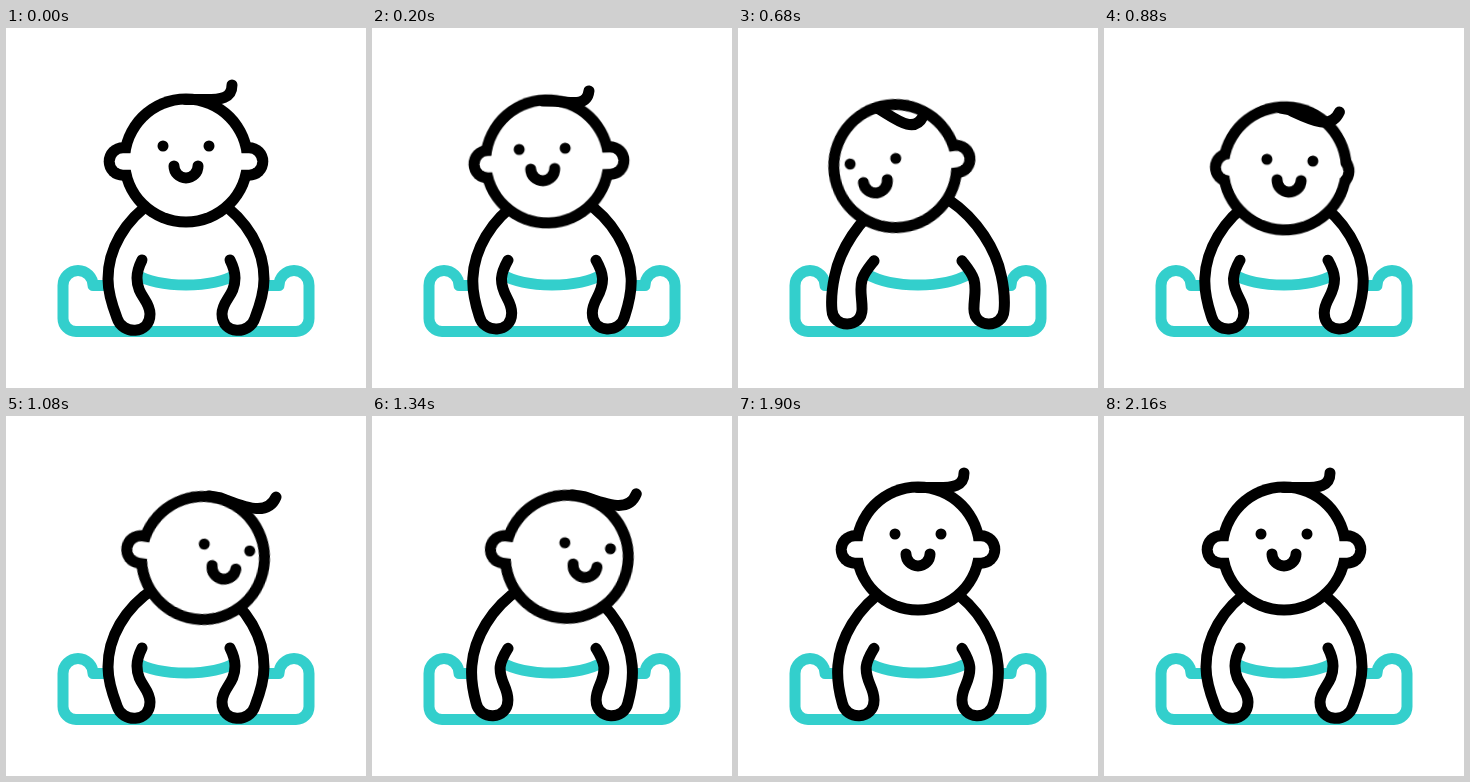
Animation of 360 by 360 pixels, one loop 2.4 s. Source, as an HTML page:

```html
<!DOCTYPE html>
<html lang="en">
<head>
<meta charset="utf-8">
<title>Baby</title>
<style>
  html, body { margin: 0; width: 100%; height: 100%; overflow: hidden; background: #fff; }
  svg { display: block; width: 100vw; height: 100vh; }

  .line { fill: none; stroke: #000; stroke-width: 11; stroke-linecap: round; stroke-linejoin: round; }
  .teal { stroke: #33cfcc; }
  .open { stroke: #fff; stroke-width: 16.6; stroke-linecap: round; }

  .arm, .head, .face, .hair, .ear-l, .ear-r {
    animation: 2400ms cubic-bezier(.6, 0, .6, 1) infinite;
  }
  .arm { fill: #fff; animation-name: arm; }
  .head { transform-origin: 180px 132.5px; animation-name: head; }
  .face { transform-origin: 180px 118px; animation-name: face; }
  .hair { animation-name: hair; }
  .ear-l { animation-name: ear-l; }
  .ear-r { animation-name: ear-r; }

  /* Arms swing out and back twice, the way back mirrors the way out */
  @keyframes arm {
    0%, 45%, 90%, 100% {
      d: path("M149 172 C118 192 102 222 102 251 C102 265 106 277 111 290 C116 307 144 307 144 286 C144 272 131 268 131 250 C131 243 133 238 136 232");
    }
    22.5%, 67.5% {
      d: path("M149 172 C121 191 102 222 95.5 247 C92 260 90 270 90 280 C90 299.5 119.5 299.5 119.5 280 C119.5 268 119 260 122.5 252 C125 245 131 239 136 233");
      animation-timing-function: cubic-bezier(.4, 0, .4, 1);
    }
  }

  /* Head: centre, left, right, centre */
  @keyframes head {
    0%, 78.33%, 100% { transform: translate(0, 0) rotate(0deg); }
    22.1% { transform: translate(-26.5px, 5.2px) rotate(-9deg); }
    45% { transform: translate(17px, 9.5px) rotate(8.6deg); }
  }
  @keyframes face {
    0%, 78.33%, 100% { transform: translate(0, 0) rotate(0deg); }
    22.1% { transform: translate(-53.3px, 15.4px) rotate(-8.5deg); }
    45% { transform: translate(41px, 13.5px) rotate(8.6deg); }
  }
  @keyframes hair {
    0%, 78.33%, 100% { d: path("M180 71.5 L195 71.5 C216 72 226 70 226 57"); }
    22.1% { d: path("M132 80 L134 81 C150 91 168 107 177 89"); }
    45% { d: path("M203 80 L215 82 C240 92 262 100 270 81"); }
  }
  @keyframes ear-l {
    0%, 45%, 78.33%, 100% { transform: translateX(0); }
    22.1% { transform: translateX(20px); }
  }
  @keyframes ear-r {
    0%, 22.1%, 78.33%, 100% { transform: translateX(0); }
    45% { transform: translateX(-20px); }
  }
</style>
</head>
<body>
<svg viewBox="0 0 360 360">
  <path class="line teal" d="M102 257.5 H87 A15 15 0 0 0 57 257.5 V290.5 A13 13 0 0 0 70 303.5 H290 A13 13 0 0 0 303 290.5 V257.5 A15 15 0 0 0 273 257.5 H258"/>
  <path class="line teal" d="M128 245.7 C155 260.7 205 260.7 232 245.7"/>

  <path class="line arm" d="M149 172"/>
  <path class="line arm" d="M149 172" transform="matrix(-1 0 0 1 360 0)"/>

  <g class="head">
    <circle class="ear-l" cx="117" cy="133.5" r="19.3"/>
    <circle class="ear-r" cx="243" cy="133.5" r="19.3"/>
    <circle cx="180" cy="132.5" r="67"/>
    <circle cx="180" cy="132.5" r="56" fill="#fff"/>
    <path class="open ear-l" d="M117 133.5 H127"/>
    <path class="open ear-r" d="M243 133.5 H233"/>
  </g>

  <path class="line hair" d="M180 71.5"/>

  <g class="face">
    <circle cx="157" cy="118" r="5.5"/>
    <circle cx="203" cy="118" r="5.5"/>
    <path class="line" d="M168 138 A12 12 0 0 0 192 138"/>
  </g>
</svg>
</body>
</html>
```
